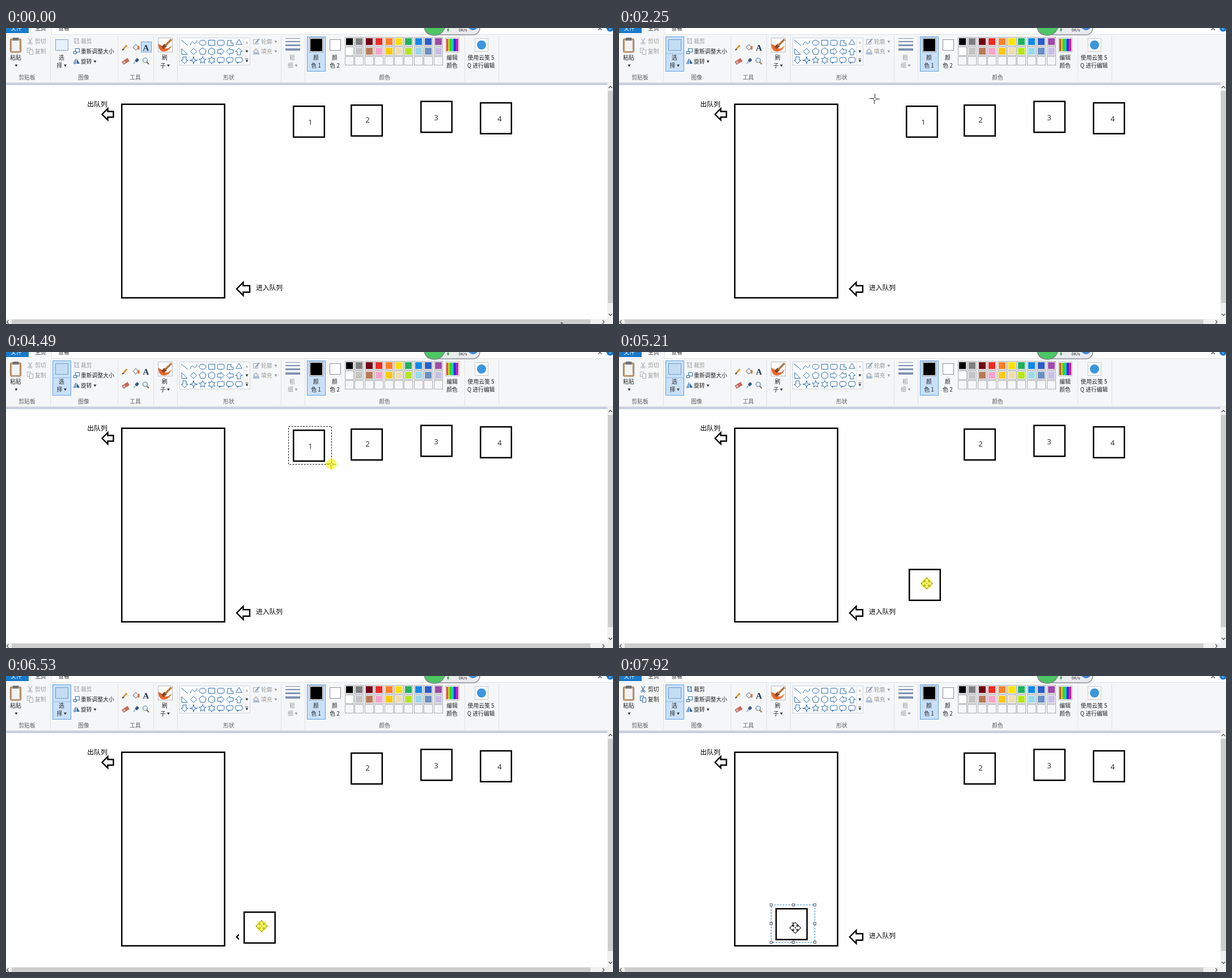
Write an HTML page with a canvas that moves like this. It is 1071 px wide and 523 px high and loops after 8000 ms.

```html
<!DOCTYPE html>
<html lang="zh">
<head>
<meta charset="utf-8">
<title>队列演示</title>
<style>
html, body { margin: 0; width: 100%; height: 100%; overflow: hidden; background: #fefefe; }
canvas { display: block; }
</style>
</head>
<body>
<canvas id="stage" width="1071" height="523"></canvas>
<script>
const g = document.getElementById('stage').getContext('2d');
const LOOP = 8000, STEP = 75, TAU = Math.PI * 2;
const CJK = '"Noto Sans CJK SC", "Noto Sans CJK", sans-serif';
const LATIN = '"Open Sans", "Noto Sans", sans-serif';
const PAPER = '#fefefe', RIBBON = '#f5f6f7', INK = '#222', DIM = '#9a9a9a';
const BLUE = '#2b6cb0', LIT = '#c9e0f7', EDGE = '#62a2e4', RULE = '#dfe1e4';

const linear = q => q;
const speedUp = q => q ** 2.5;
const slowDown = q => 1 - (1 - q) ** 2.45;

// Moments of the story: press, tool chosen, marquee, release, grab, drop.
const PRESS = 930, TOOL = 1070, MARK = 3790, MARKED = 4640, GRAB = 5040, DROP = 7610;

// Pointer strokes: start, end, target x and y, easing.
const strokes = [
  [70, 230, 520, 151],
  [370, 850, 95, 23],
  [TOOL, 1150, 432, 158],
  [1230, 1470, 566, 172],
  [1550, 1780, 506, 137],
  [1930, 2100, 501, 137],
  [2250, 2790, 97, 37],
  [2950, 3250, 511, 142, speedUp],
  [3400, 3620, 498, 132],
  [MARK, 4170, 571, 197],
  [4400, 4490, 574, 198],
  [MARKED, 4870, 538, 163],
  [5130, 5350, 544, 464, slowDown],
  [5520, 5660, 539, 450],
  [6300, 6530, 451, 442],
  [6600, 7080, 308, 436],
  [DROP, 7690, 311, 459],
  [7860, 7920, 311, 445]
];

// The screen was sampled about every STEP ms, so strokes advance in jumps.
function pointerAt(t) {
  let x = 980, y = 520;
  for (const [from, to, tx, ty, ease = linear] of strokes) {
    if (t < from) break;
    const gaps = Math.round((to - from) / STEP);
    const done = Math.floor((t - from + 3) / (to - from) * gaps) + 1;
    const p = ease(Math.min(1, done / (gaps + 1)));
    x += (tx - x) * p;
    y += (ty - y) * p;
  }
  return { x: Math.round(x), y: Math.round(y) };
}

const repeat = (n, draw) => { for (let i = 0; i < n; i++) draw(i); };
const within = (p, x, y, w, h) => p.x >= x && p.x <= x + w && p.y >= y && p.y <= y + h;

function text(s, x, y, { size = 9.8, color = INK, align = 'center', font = CJK, weight = '' } = {}) {
  g.font = `${weight} ${size}px ${font}`;
  g.fillStyle = color;
  g.textAlign = align;
  g.fillText(s, x, y + size * 0.37);
}
const left = (s, x, y, color) => text(s, x, y, { color, align: 'left' });

function paint(fill, stroke, width = 1) {
  if (fill) { g.fillStyle = fill; g.fill(); }
  if (stroke) { g.strokeStyle = stroke; g.lineWidth = width; g.stroke(); }
}
function trace(pts, closed = true) {
  g.beginPath();
  for (let i = 0; i < pts.length; i += 2) g.lineTo(pts[i], pts[i + 1]);
  if (closed) g.closePath();
}
function poly(pts, ...style) { trace(pts); paint(...style); }
function line(pts, ...style) { trace(pts, false); paint(null, ...style); }
function disc(x, y, rx, ry, ...style) {
  g.beginPath();
  g.ellipse(x, y, rx, ry, 0, 0, TAU);
  paint(...style);
}
function pill(x, y, w, h, r, ...style) {
  g.beginPath();
  g.roundRect(x, y, w, h, r);
  paint(...style);
}
function block(x, y, w, h, color) { g.fillStyle = color; g.fillRect(x, y, w, h); }
function box(x, y, w, h, fill, stroke, width = 1) {
  if (fill) block(x, y, w, h, fill);
  g.strokeStyle = stroke;
  g.lineWidth = width;
  g.strokeRect(x + width / 2, y + width / 2, w - width, h - width);
}
function at(x, y, draw, turn = 0) {
  g.save();
  g.translate(x, y);
  g.rotate(turn);
  draw();
  g.restore();
}
function dashed(on, draw) {
  g.setLineDash([on, on * 0.7]);
  draw();
  g.setLineDash([]);
}

// Corners of an n-gon, or of a star when inner < 1.
function radial(n, r, inner = 1) {
  const corners = inner < 1 ? n * 2 : n, pts = [];
  repeat(corners, i => {
    const d = i % 2 && inner < 1 ? r * inner : r, a = i / corners * TAU;
    pts.push(d * Math.sin(a), -d * Math.cos(a));
  });
  return pts;
}
// A hollow arrow pointing left, with its tip at the origin.
function arrow(k, ...style) {
  const head = 10 * k, half = 5 * k, end = 20 * k;
  poly([0, 0, head, -head, head, -half, end, -half, end, half, head, half, head, head], ...style);
}
const drop = (x, y, color = '#333') => at(x, y, () => poly(radial(3, 2.8), color), Math.PI);
const chevron = (x, y, turn) => at(x, y, () => line([-3, 1.5, 0, -1.5, 3, 1.5], '#505050', 1.4), turn * TAU / 4);

const thin = ['#fbfcfe', BLUE];
const solid = (...spec) => () => poly(radial(...spec), ...thin);
const pointing = turn => () => at(0, 0, () => at(-6, 0, () => arrow(0.6, ...thin)), turn * TAU / 4);
const bubble = r => () => { pill(-6, -5, 12, 8.5, r, ...thin); line([-3, 3.5, -3, 6, 0, 3.5], BLUE); };
const shapes = [
  () => line([-6, -5, 6, 5], BLUE),
  () => { g.beginPath(); g.moveTo(-6, 4); g.bezierCurveTo(0, -12, 0, 12, 6, -4); paint(null, BLUE); },
  () => disc(0, 0, 6, 4.5, ...thin),
  () => pill(-5.5, -4.5, 11, 9, 0, ...thin),
  () => pill(-6, -4.5, 12, 9, 2.5, ...thin),
  () => poly([-5, 5, -4, -4, 3, -4, 1, 0, 6, 1, 6, 5], ...thin),
  solid(3, 6), () => poly([-5, -5, 5, 5, -5, 5], ...thin),
  solid(4, 5.5), solid(5, 6.3), solid(6, 6.3),
  pointing(2), pointing(0), pointing(1), pointing(3),
  solid(4, 6.5, 0.3), solid(5, 6.5, 0.43), solid(6, 6.5, 0.55),
  bubble(2), bubble(4), bubble(3)
];
const palette = ('#000 #7f7f7f #700014 #ec2a28 #ff7f27 #ffdf00 #22b060 #0f8ae8 #2c5cc5 #a04aa8 ' +
  '#fff #c3c3c3 #b97a57 #f7a3cb #ffc90e #efdcb0 #b5e61d #99d9ea #6a8fc4 #c8bfe7').split(' ');

function tabs() {
  block(0, 0, 1071, 12, '#fff');
  block(0, 12, 1071, 85, RIBBON);
  block(0, 11, 1071, 1, RULE);
  block(40, 0, 41, 13, RIBBON);
  block(80, 0, 1, 12, RULE);
  block(0, 0, 40, 9, '#1979ca');
  text('文件', 18, 0, { color: '#fff' });
  text('主页', 61, 0);
  text('查看', 102, 0);
  chevron(1048, 2, 0);
  disc(1066, 0, 6.5, 6.5, '#1979ca');
  text('?', 1066, 0, { size: 9, color: '#fff', font: LATIN, weight: 'bold' });
}

function speedWidget() {
  pill(739, -14, 97, 26, 12, '#e9ebee', '#8b8f96', 1.5);
  disc(756, -6, 19, 19, '#4cc764', '#7f8a88', 1.5);
  line([780, -2, 780, 5], '#30a848', 1.5);
  drop(780, 4, '#30a848');
  text('0K/s', 806, 3, { size: 7.5, font: LATIN });
  disc(824, -5, 9, 9, '#3f88d8');
}

function clipboard(on) {
  const ink = on ? INK : DIM, tone = on ? BLUE : '#a9afb8';
  pill(7.5, 19, 19, 24, 2, '#c99f73', '#8f6b45');
  box(10, 22, 14, 19, '#fcfcfc', '#d5d5d5');
  block(12, 17, 10, 5, '#6d7178');
  repeat(4, i => block(12, 26 + i * 3.5, 10, 1, '#d4dbe4'));
  text('粘贴', 17, 52);
  drop(18, 66);
  for (const side of [-1, 1]) {
    line([42.5 + side * 3, 18, 42.5 - side * 1.5, 26], tone, 1.2);
    disc(42.5 + side * 2, 27, 1.7, 1.5, null, tone);
  }
  repeat(2, i => box(37 + i * 4, 35 + i * 3, 7, 9, '#fafafa', tone));
  left('剪切', 51, 23, ink);
  left('复制', 51, 41, ink);
  at(124.5, 23, () => {
    repeat(2, () => { line([-3, -5, -3, 4, 5, 4], tone, 1.2); g.rotate(Math.PI); });
    line([-3, 4, 4, -5], tone, 0.8);
  });
  left('裁剪', 132, 23, ink);
}

function imageTools(chosen, pos) {
  const over = within(pos, 82, 15, 33, 61);
  if (chosen || over) {
    box(82, 15, 33, 62, chosen ? LIT : '#edf3f9', chosen ? EDGE : '#a9cdf0');
    block(83, 45, 31, 1, chosen ? '#8fbcec' : '#c5dcf3');
  }
  dashed(2, () => box(87, 20, 23, 20, chosen ? '#c4ddf5' : '#e6f0fa', '#2d6ca8'));
  text('选', 98, 52);
  text('择', 94.5, 66);
  drop(104.5, 66);
  if (within(pos, 117, 32, 76, 17)) box(117, 32, 76, 18, '#e8f1fa', '#a4cbf2');
  box(122, 36, 8, 7, '#fff', BLUE);
  box(119, 41, 6, 5, '#fff', BLUE);
  left('重新调整大小', 132, 41);
  poly([119, 63, 123.5, 54, 123.5, 63], '#8fb7e0', '#5a86b5');
  poly([125, 55, 130, 63, 125, 63], '#1f5fa8');
  left('旋转', 132, 59);
  drop(157, 59);
}

function drawTools(typing) {
  if (typing) box(238, 24, 19, 19, LIT, EDGE);
  at(210, 34, () => {
    block(-7, -1, 4, 2, '#42382d');
    block(-4, -1.5, 9, 3, '#e0983a');
  }, -0.85);
  at(229, 34, () => box(-4, -4, 8, 8, '#eef2f6', '#7b8794'), TAU / 8);
  disc(234, 35, 1.8, 3.5, '#d9763b');
  text('A', 247, 34, { size: 15, color: '#1e3350', font: '"Liberation Serif", serif', weight: 'bold' });
  at(211, 59, () => {
    box(-6, -3, 12, 6, '#eaa9a0', '#a2665d');
    block(-1, -3, 7, 6, '#c66a55');
  }, -0.55);
  at(229, 59, () => {
    block(-6, -1.2, 7, 2.4, '#9fc2e2');
    block(0, -2.5, 6, 5, '#31577f');
  }, -0.8);
  line([248, 60, 252, 64], '#8a6a48', 2);
  disc(245.5, 57, 4, 4, '#e4f1fb', '#6f8090', 1.2);
}

function brushAndShapes() {
  box(268, 17, 26, 26, '#fafafa', '#b7bdc4');
  g.beginPath();
  g.moveTo(269, 28);
  g.bezierCurveTo(268, 47, 288, 44, 292, 31);
  g.bezierCurveTo(286, 38, 280, 38, 276, 32);
  paint('#e8672a');
  line([276, 35, 282, 30], '#8d4522', 6);
  line([281, 31, 292, 20], '#b5773d', 3.5);
  text('刷', 280, 52);
  text('子', 277, 66);
  drop(286.5, 66);

  box(306, 17, 125, 49, '#fbfcfd', '#cfd4da');
  block(419, 17, 1, 49, RULE);
  repeat(2, i => block(419, 33 + i * 16, 12, 1, RULE));
  shapes.forEach((draw, i) => at(315 + i % 7 * 16, 26 + Math.floor(i / 7) * 15.5, draw));
  at(425, 26, () => poly(radial(3, 2.8), '#b8b8b8'));
  block(422.5, 54, 5, 1, '#444');
  drop(425, 41);
  drop(425, 58);

  box(436, 20, 9, 9, null, '#a3abb5');
  line([440, 27, 447, 19], '#8fa0b4', 2);
  at(441, 41, () => box(-3.5, -3.5, 7, 7, '#e4e9ef', '#98a3b0'), TAU / 8);
  block(436, 43, 11, 4, '#a9bdd4');
  ['轮廓', '填充'].forEach((s, i) => {
    left(s, 450, 24 + i * 17, DIM);
    drop(476, 24 + i * 17, DIM);
  });
  repeat(4, i => block(493, 18 + i * (9 + i) / 2, 26, 1 + i, '#7f92b3'));
  text('粗', 505, 52, { color: DIM });
  text('细', 502, 66, { color: DIM });
  drop(512, 66, DIM);
}

function colors() {
  box(531, 15, 33, 62, LIT, EDGE);
  box(535, 17, 25, 26, '#fff', '#8d9aa8');
  block(537, 19, 21, 22, '#000');
  box(571, 20, 20, 20, '#fff', '#8f8f8f');
  repeat(2, i => {
    text('颜', 547 + i * 33, 52);
    text('色 ' + (i + 1), 547 + i * 33, 66);
  });
  repeat(30, i => {
    const x = Math.round(598 + i % 10 * 17.4), y = 16 + Math.floor(i / 10) * 17;
    box(x, y, 16, 16, '#fff', '#a5a7aa');
    block(x + 2, y + 2, 12, 12, palette[i] || RIBBON);
  });
  box(775, 17, 25, 26, '#fff', '#b7bdc4');
  repeat(21, i => block(777 + i, 19, 1, 22, `hsl(${i * 17},75%,48%)`));
  text('编辑', 787, 52);
  text('颜色', 787, 66);
  box(827, 18, 24, 24, '#fbfbfb', '#c4c9cf');
  disc(839, 30, 8, 8, '#3a96dd');
  text('使用云笺 5', 838, 52);
  text('Q 进行编辑', 838, 66);
}

function frame() {
  for (const x of [78, 197, 260, 302, 485, 527, 809, 869]) block(x, 14, 1, 80, RULE);
  const groups = { 剪贴板: 37, 图像: 137, 工具: 228, 形状: 393, 颜色: 668 };
  for (const name in groups) text(name, groups[name], 87, { color: '#5c5c5c' });
  block(0, 96, 1071, 1, RULE);
  block(0, 97, 1061, 4, '#c9cfdf');
  block(1061, 97, 10, 426, '#f0f0f0');
  block(0, 514, 1071, 9, '#f0f0f0');
  block(1062, 111, 9, 375, '#cdcdcd');
  block(10, 515, 1021, 8, '#cdcdcd');
  chevron(1066.5, 104.5, 0);
  chevron(1066.5, 506.5, 2);
  chevron(3, 519.5, 3);
  chevron(1054, 519.5, 1);
}

function numbered(n, x, y, dx = 31, dy = 29) {
  box(x, y, 57, 57, null, '#000', 2.5);
  text(n, x + dx, y + dy, { size: 13, font: LATIN });
}
function drawing() {
  box(203, 133.5, 184, 344.5, null, '#000', 2.5);
  text('出队列', 161, 135, { size: 11.8, color: '#000' });
  text('进入队列', 464.5, 459, { size: 11.8, color: '#000' });
  at(169.5, 152.5, () => arrow(1, null, '#000', 2.4));
  at(407, 461, () => arrow(1.15, null, '#000', 2.4));
  numbered(2, 608, 135, 30, 27);
  numbered(3, 731, 128.5, 28, 30);
  numbered(4, 836, 131, 35);
}

function selection(t, pos) {
  const hand = pointerAt(Math.min(t, DROP - 1));
  const lifted = t >= GRAB, x = lifted ? hand.x - 32 : 506, y = lifted ? hand.y - 26 : 137;
  const l = x - 8, u = y - 6, w = 78, h = 67;
  if (lifted) block(l, u, w, h, PAPER);
  numbered(1, x, y);
  if (t < MARK || lifted && t < DROP) return;
  if (t < MARKED) {
    dashed(3, () => box(l, u, Math.max(1, pos.x - l + 1), Math.max(1, pos.y - u + 1), null, '#111'));
    return;
  }
  dashed(3, () => box(l, u, w, h, null, '#1b7fc4'));
  repeat(9, i => {
    if (i !== 4) box(Math.round(l - 2 + i % 3 * (w - 1) / 2), u - 2 + Math.floor(i / 3) * (h - 1) / 2, 5, 5, '#fff', '#555');
  });
}

const fourWays = draw => repeat(4, i => at(0, 0, draw, i * TAU / 4));
function moveCross() {
  fourWays(() => at(-9, 0, () => arrow(0.4, null, '#111', 2)));
  fourWays(() => at(-9, 0, () => arrow(0.4, '#fff')));
}
function crosshair() {
  fourWays(() => line([2, 0.5, 9, 0.5], INK));
  disc(0.5, 0.5, 2.5, 2.5, '#fff', '#333', 0.8);
}
function beam() {
  line([0.5, -7.5, 0.5, 7.5], INK);
  for (const y of [-7.5, 7.5]) line([-3, y, 4, y], INK);
}
const pointer = () => poly([0, 0, 0, 13, 3, 10.3, 5.4, 15.6, 7.8, 14.5, 5.5, 9.4, 9.5, 9.4], '#fff', '#111');

function cursor(t, pos) {
  const bare = pos.y < 97 || pos.y > 513;
  const inside = t >= GRAB || t >= MARKED && within(pos, 500, 133, 72, 63);
  const pressed = t >= PRESS && t < TOOL || t >= MARK && t < MARKED || t >= GRAB && t < DROP;
  at(pos.x, pos.y, () => {
    (bare ? pointer : t < TOOL ? beam : inside ? moveCross : crosshair)();
    const shift = bare ? 3 : 0;
    if (pressed) disc(shift, shift, 9.5 + shift / 2, 9.5 + shift / 2, 'rgba(250,245,30,.68)');
  });
}

function render(t) {
  const pos = pointerAt(t), chosen = t >= TOOL;
  block(0, 0, 1071, 523, PAPER);
  tabs();
  speedWidget();
  clipboard(t >= MARKED && t < GRAB || t >= DROP);
  imageTools(chosen, pos);
  drawTools(!chosen);
  brushAndShapes();
  colors();
  frame();
  drawing();
  selection(t, pos);
  cursor(t, pos);
}

const began = performance.now();
function tick() {
  render((performance.now() - began) % LOOP);
  requestAnimationFrame(tick);
}
tick();
</script>
</body>
</html>
```
